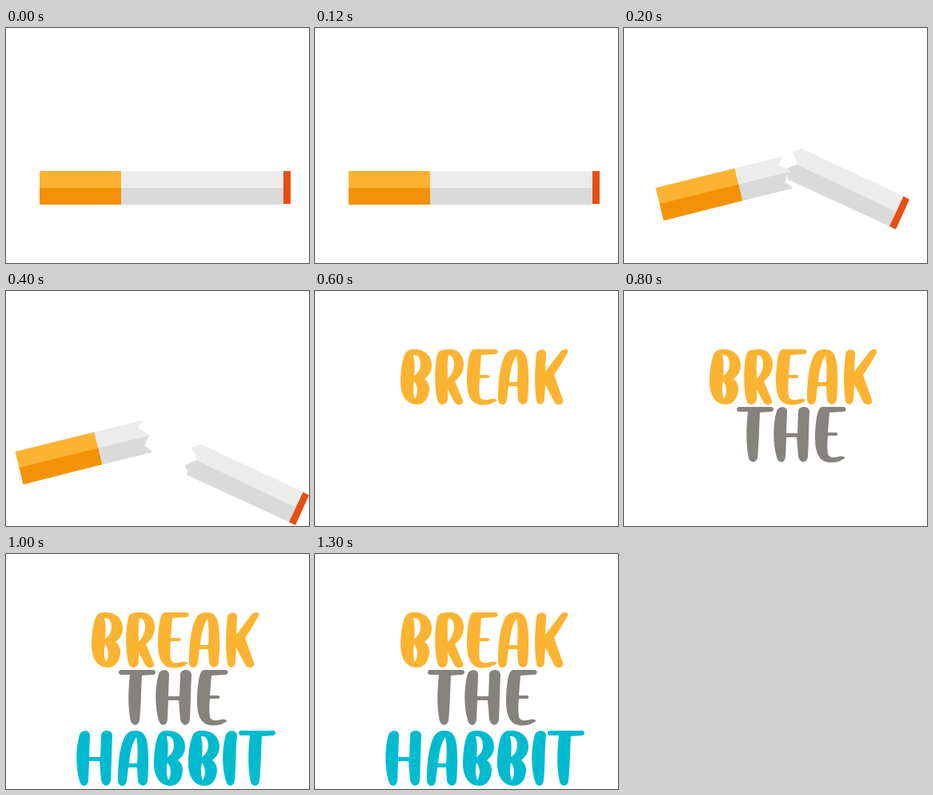
An HTML page that plays this animation: 379x294 px, repeating every 1500 ms.

```html
<!DOCTYPE html>
<html lang="en">
<head>
<meta charset="utf-8">
<title>Break the habbit</title>
<style>
  html, body { margin: 0; width: 100%; height: 100%; overflow: hidden; background: #fff; }
  svg { display: block; width: 379px; height: 294px; }
  .hi { fill: #fbb332; }
  .lo { fill: #f39204; }
  .pale { fill: #ececec; }
  .dim { fill: #dadada; }
  .ember { fill: #e84e10; }
</style>
</head>
<body>
<svg viewBox="0 0 379 294">
  <g id="whole">
    <path class="hi" d="M42 179H144V200H42Z"/>
    <path class="lo" d="M42 200H144V221H42Z"/>
    <path class="pale" d="M144 179H347V200H144Z"/>
    <path class="dim" d="M144 200H347V221H144Z"/>
    <path class="ember" d="M347 179H356V220H347Z"/>
  </g>
  <g id="tip">
    <path class="pale" d="M210 155L222 151L349 210L340 230L217 171Q215 163 210 155Z"/>
    <path class="dim" d="M217 171L340 229.500L332 248L204 189L205 184L202 178Q206 173 217 171Z"/>
    <path class="ember" d="M349.500 210.500L357 214.500L340 252L332 248Z"/>
  </g>
  <g id="butt">
    <path class="hi" d="M39.500 200L138.500 175.500L143.500 196L44.500 220.500Z"/>
    <path class="lo" d="M44.500 220L143.500 195.500L148.500 216L49.500 241Z"/>
    <path class="pale" d="M138.500 175.500L199 160.500L193 171L207 178L208 180L143.500 196Z"/>
    <path class="dim" d="M143.500 195.500L208 179.500Q203 185 201.500 193L210 199V201L148.500 216Z"/>
  </g>
  <g id="words"></g>
</svg>
<script>
const $ = id => document.getElementById(id);
const LOOP = 1500;

// Brush letters, 69 units tall, drawn from the top left corner
const glyphs = {
  A: "M0 63C0 40 2 24 7 11C10 3 15 0 22 0C32 0 36 7 37 18C39 33 38 50 37 63C36 70 27 71 25 63L24 46H13L11 63C10 71 1 71 0 63Z M14 41H24C25 29 25 17 23 8C18 15 15 27 14 41Z",
  B: "M5 7C8 0 13 0 18 0C31 0 39 9 39 20C39 28 35 33 30 37C34 40 36 44 36 49C36 60 30 69 21 69C7 69 0 57 0 41C0 28 2 14 5 7Z M16 7C23 6 25 13 25 18C25 25 22 30 17 33C18 25 18 15 16 7Z M17 40C22 45 22 57 18 62C16 56 15 48 17 40Z",
  E: "M9 0H35C40 0 40 6 35 6L18 7L16 32H26C29 32 29 36 26 36H16C15 47 15 57 17 61C22 66 30 61 34 62C38 62 38 65 34 66C28 70 20 70 15 69C5 67 0 57 0 40C0 24 2 10 4 5C5 2 7 0 9 0Z",
  H: "M4 5C6 -1 17 -2 17 6L16 33H30L31 6C31 -2 45 -2 45 6C44 24 44 44 43 62C42 71 33 71 31 62L29 38H16L15 62C14 71 6 71 4 63C-1 46 -1 22 4 5Z",
  I: "M4 5C6 -1 18 -2 18 6C16 24 17 44 15 62C14 71 6 71 4 63C-1 46 -1 22 4 5Z",
  K: "M2 6C3 -1 14 -1 14 5L13 28L32 3C35 -1 43 -1 41 4C36 14 30 23 24 32L35 63C37 69 28 71 25 67L13 44L12 63C11 70 3 71 2 64C-1 45 0 24 2 6Z",
  R: "M4 4C7 0 14 0 21 0C31 1 36 10 36 18C36 28 31 35 25 40L35 64C37 69 29 71 25 67L16 50L16 62C15 70 7 71 4 66C-1 50 -1 18 4 4Z M17 7C23 8 24 14 24 19C24 26 20 33 16 37C16 27 15 16 17 7Z",
  T: "M3 0H43C47 0 47 6 43 6L29 7C28 24 28 45 26 63C25 70 17 71 15 64C11 46 12 24 14 6H3C-1 6 -1 0 3 0Z"
};

function word(text, top, colour, lefts) {
  const paths = [...text].map((c, i) =>
    `<path d="${glyphs[c]}" transform="translate(${lefts[i]} ${top})"/>`);
  $("words").insertAdjacentHTML("beforeend",
    `<g role="img" aria-label="${text}" fill="${colour}" fill-rule="evenodd">${paths.join("")}</g>`);
  return $("words").lastElementChild;
}

const words = [
  word("BREAK", 73, "#fbb332", [107, 150, 190, 229, 275]),
  word("THE", 145, "#86827e", [141, 187, 239]),
  word("HABBIT", 221, "#00bbcf", [88, 140, 185, 228, 271, 291])
];

const show = (el, on) => el.setAttribute("visibility", on ? "visible" : "hidden");

function draw(now) {
  const t = now % LOOP;
  const broken = t >= 200 && t < 600;
  const apart = t >= 400;
  show($("whole"), t < 200);
  show($("butt"), broken);
  show($("tip"), broken);
  $("butt").setAttribute("transform", apart ? "translate(-28 1)" : "");
  $("tip").setAttribute("transform", apart ? "translate(22 41)" : "");
  words.forEach((w, i) => show(w, t >= 600 + 200 * i));
}

let start;
function tick(now) {
  start ??= now;
  draw(now - start);
  requestAnimationFrame(tick);
}
draw(0);
requestAnimationFrame(tick);
</script>
</body>
</html>
```
